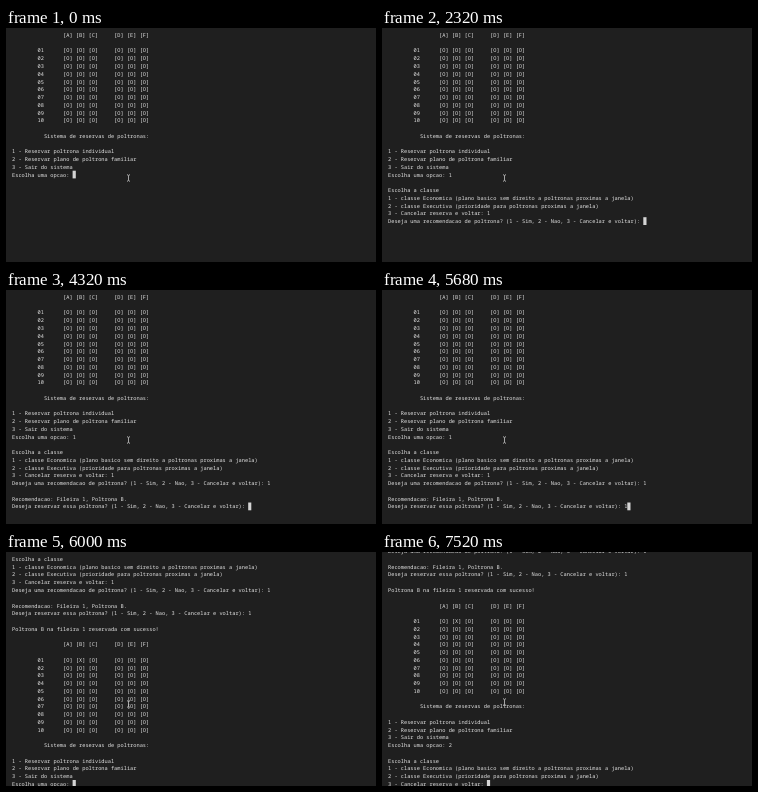
An HTML page for the animation above (8 s loop, 370 by 234 pixels).

```html
<!DOCTYPE html>
<html lang="pt">
<head>
<meta charset="utf-8">
<title>Reservas</title>
<style>
html, body { margin: 0; width: 100%; height: 100%; overflow: hidden; background: #1f1f1f; }
/* Laid out at ten times the size so that fractional cell sizes stay exact */
#term {
  position: absolute; left: 6px; top: 3px; transform: scale(.1); transform-origin: 0 0;
  font: 53.2px/77.6px "Noto Sans Mono", monospace; color: #e6e6e6;
  white-space: pre; text-rendering: geometricPrecision; font-variant-ligatures: none;
}
#text, #cursor { position: absolute; left: 0; }
#cursor { width: 1ch; height: 77.6px; background: #d4d4d4; color: #1f1f1f; }
#mouse { position: absolute; left: 120px; width: 5px; height: 8px; }
</style>
</head>
<body>
<div id="term"><div id="text"></div><div id="cursor"></div></div>
<svg id="mouse" viewBox="0 0 5 8" fill="none" stroke="#c8c8c8" stroke-width=".8">
  <path d="M1 .9H2L2.5 1.4L3 .9H4M2.5 1.4V6.6M1 7.1H2L2.5 6.6L3 7.1H4"/>
</svg>
<script>
const LOOP = 8000, ROWS = 30;
const $ = id => document.getElementById(id);
const pad = n => ' '.repeat(n);

function seats(taken) {
  const row = (label, cell) =>
    (pad(8) + label).padEnd(16) + [0, 1, 2].map(cell).join(' ') + pad(5) + [3, 4, 5].map(cell).join(' ');
  const lines = [row('', c => `[${'ABCDEF'[c]}]`), ''];
  for (let r = 1; r <= 10; r++)
    lines.push(row(String(r).padStart(2, '0'), c => r === 1 && c === taken ? '[X]' : '[O]'));
  return lines.join('\n');
}

const menu = `

${pad(10)}Sistema de reservas de poltronas:

1 - Reservar poltrona individual
2 - Reservar plano de poltrona familiar
3 - Sair do sistema`;
const ask = '\nEscolha uma opcao: ';
const classes = `

Escolha a classe
1 - classe Economica (plano basico sem direito a poltronas proximas a janela)
2 - classe Executiva (prioridade para poltronas proximas a janela)
3 - Cancelar reserva e voltar: `;
const choice = '(1 - Sim, 2 - Nao, 3 - Cancelar e voltar): ';

// [time, output added]; a final \r leaves the cursor at the line start
const events = [
  [0, seats() + menu + ask],
  [560, '1'],
  [720, classes],
  [2080, '1'],
  [2320, '\nDeseja uma recomendacao de poltrona? ' + choice],
  [4000, '1'],
  [4320, '\n\nRecomendacao: Fileira 1, Poltrona B.\nDeseja reservar essa poltrona? ' + choice],
  [5680, '1'],
  [5920, '\n\nPoltrona B na fileira 1 reservada com sucesso!\n\n' + seats(1) + menu + '\r'],
  [6000, ask],
  [7200, '2'],
  [7520, classes],
];

function draw(t) {
  const out = events.filter(e => e[0] <= t).map(e => e[1]).join('');
  const lines = out.replace(/\r/g, '').split('\n');
  const scroll = Math.max(0, lines.length - ROWS);
  const first = Math.max(0, scroll - 1);  // one partly visible line above
  const last = lines[lines.length - 1];
  const col = out.endsWith('\r') ? 0 : last.length;
  $('text').textContent = lines.slice(first).join('\n');
  $('text').style.top = (first - scroll) * 77.6 + 'px';
  $('cursor').textContent = last[col] || '';
  $('cursor').style.left = col + 'ch';
  $('cursor').style.top = (lines.length - 1 - scroll) * 77.6 + 'px';
  $('mouse').style.top = (t >= 5920 && t < 7520 ? 148 : 146) + 'px';
}

let shown = -1;
function tick() {
  const t = performance.now() % LOOP;
  const step = events.filter(e => e[0] <= t).length;
  if (step !== shown) draw(t);
  shown = step;
  requestAnimationFrame(tick);
}
tick();
</script>
</body>
</html>
```
